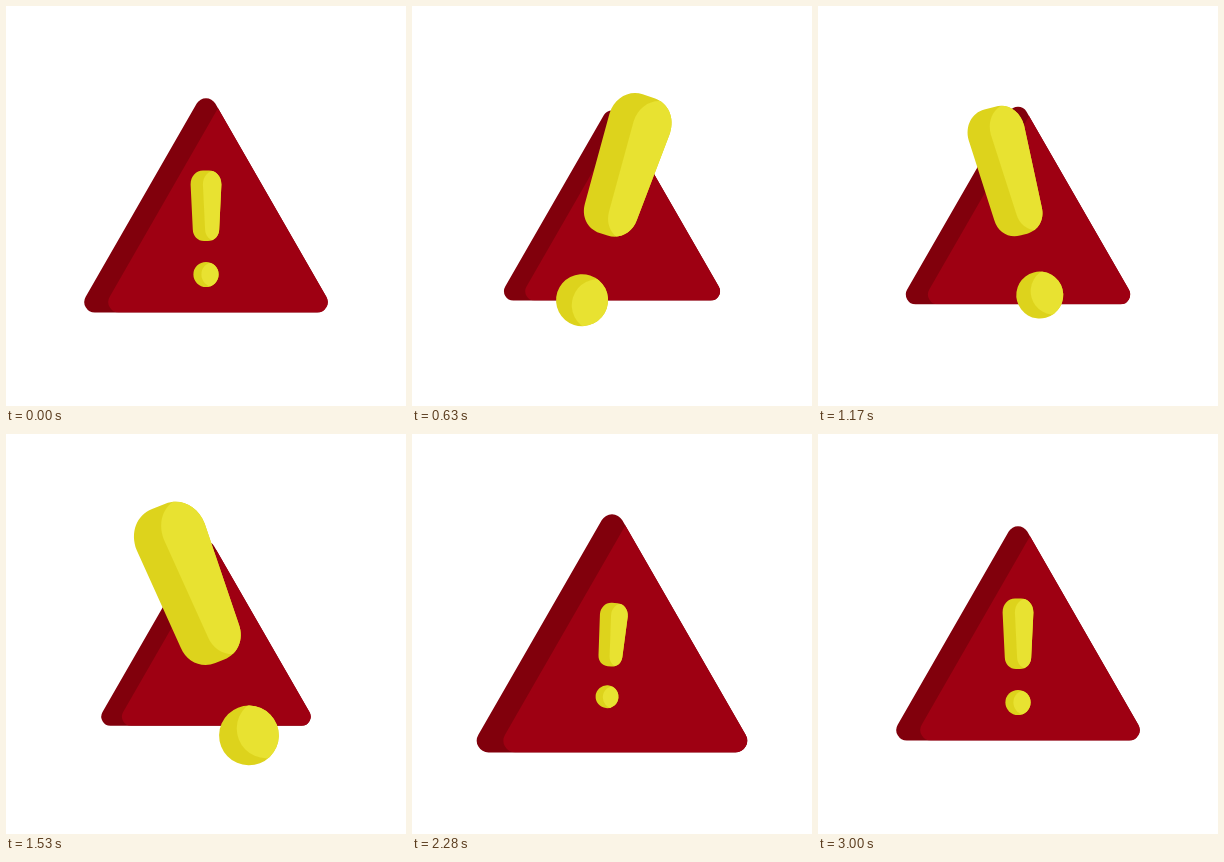
Recreate the animation shown at these times as an HTML page. Size 400 by 400 pixels, loop 3.03 s.

```html
<!DOCTYPE html>
<html lang="en">
<head>
<meta charset="utf-8">
<title>Warning sign</title>
<style>
  html, body { margin: 0; width: 100%; height: 100%; overflow: hidden; background: #fff; }
  svg { display: block; width: 100vw; height: 100vh; }

  .sign { fill: #81000c; transform-origin: 200px 200px; }
  .sign .lit { fill: #9e0012; }
  .mark { fill: #ddd31c; transform-origin: 200px 222.5px; }
  .mark .lit { fill: #e8e231; }

  .sign, .mark {
    animation: 3.03s cubic-bezier(.333, 0, .667, 1) infinite;
  }
  .sign { animation-name: pulse; }
  .mark { animation-name: leap, swing; }

  @keyframes pulse {
    0%, 99%, 100% { scale: 1; }
    14.2% { scale: .86; }
    32.4% { scale: .951; }
    48.8%, 57.9% { scale: .86; }
    72.6% { scale: 1.122; }
    88.8% { scale: .97; }
  }

  /* The mark jumps forward twice, rising as it grows. */
  @keyframes leap {
    0%, 99%, 100% { translate: 0 0; scale: 1; }
    12.9%, 15.8% { translate: 1px -22.5px; scale: 2.38; }
    29.7% { translate: -4px -9.5px; scale: 1.32; }
    47.2%, 51.8% { translate: 3px -22.5px; scale: 2.37; }
    75.2% { translate: -1.5px -1.3px; scale: .906; }
  }

  @keyframes swing {
    0%, 99%, 100% { rotate: 0deg; }
    15.5% { rotate: 21.5deg; }
    46.2%, 51.8% { rotate: -21.5deg; }
    75.2% { rotate: 4.8deg; }
  }
</style>
</head>
<body>
<svg viewBox="0 0 400 400">
  <defs>
    <path id="tri" d="M190.7 97.6A10.75 10.75 0 0 1 209.3 97.6L320.3 290.7A10.6 10.6 0 0 1 311 306.6H89A10.6 10.6 0 0 1 79.7 290.7Z"/>
    <path id="bar" d="M184.6 178.4C184.6 170.4 190 164.6 197 164.6H203C210 164.6 215.4 170.4 215.4 178.4L213.2 223.4C213 230 208.3 234.9 202 234.9H198C191.7 234.9 187 230 186.8 223.4Z"/>
    <circle id="dot" cx="200" cy="268.5" r="12.6"/>
    <clipPath id="triClip"><use href="#tri"/></clipPath>
    <clipPath id="barClip"><use href="#bar"/></clipPath>
    <clipPath id="dotClip"><use href="#dot"/></clipPath>
  </defs>
  <g class="sign">
    <use href="#tri"/>
    <g clip-path="url(#triClip)"><use class="lit" href="#tri" x="24"/></g>
  </g>
  <g class="mark">
    <use href="#bar"/>
    <g clip-path="url(#barClip)"><use class="lit" href="#bar" x="12.3"/></g>
    <use href="#dot"/>
    <g clip-path="url(#dotClip)"><use class="lit" href="#dot" x="8"/></g>
  </g>
</svg>
</body>
</html>
```
